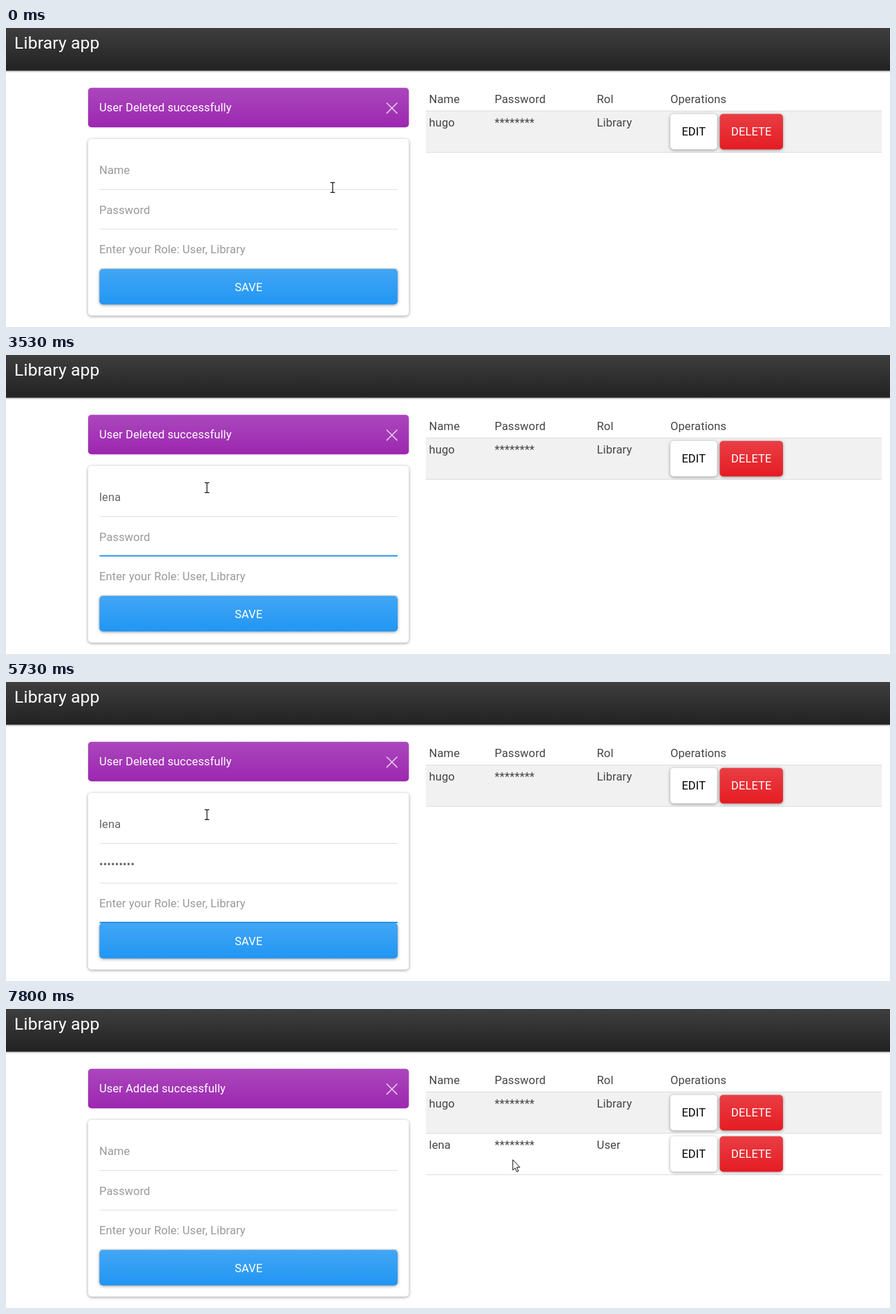
Animation of 1280x434 px, one loop 8 s. Source, as an HTML page:

```html
<!DOCTYPE html>
<html lang="en">
<head>
<meta charset="utf-8">
<title>Library app</title>
<style>
html, body { margin: 0; width: 100%; height: 100%; overflow: hidden; background: #fff; }
svg { display: block; }
text {
  font: 16.5px Roboto, sans-serif; letter-spacing: .11px; fill: #444;
  white-space: pre;
}
.title { font-size: 24.75px; }
.white { fill: #fff; }
.black { fill: #000; }
.mid { text-anchor: middle; }
.raised { filter: drop-shadow(0 1px 2px rgba(0,0,0,.4)); }
.bar { filter: drop-shadow(0 1px 1px rgba(0,0,0,.5)); }
</style>
</head>
<body>
<svg id="stage" width="1280" height="434">
  <defs>
    <linearGradient id="dark" x2="0" y2="1"><stop stop-color="#3e3e3e"/><stop offset="1" stop-color="#222"/></linearGradient>
    <linearGradient id="purple" x2="0" y2="1"><stop stop-color="#ab47bc"/><stop offset="1" stop-color="#9c27b0"/></linearGradient>
    <linearGradient id="blue" x2="0" y2="1"><stop stop-color="#42a6f5"/><stop offset="1" stop-color="#2196f3"/></linearGradient>
    <linearGradient id="red" x2="0" y2="1"><stop stop-color="#e93e44"/><stop offset="1" stop-color="#e51c23"/></linearGradient>
  </defs>
  <rect class="bar" x="-5" y="0" width="1290" height="61.8" fill="url(#dark)"/>
  <text class="white title" x="12.1" y="30.4">Library app</text>

  <rect x="118.8" y="86.7" width="464.6" height="57.6" rx="5" fill="url(#purple)"/>
  <text class="white" id="notice" x="135" y="121.4"></text>
  <path d="M551 108.5l15.6 15.6m0-15.6l-15.6 15.6" stroke="#fff" stroke-opacity=".7" stroke-width="1.7"/>

  <rect class="raised" x="118.8" y="161" width="464.6" height="256.4" rx="5" fill="#fff"/>
  <g id="fields"></g>
  <rect class="raised" x="135.3" y="349.7" width="431.8" height="51.6" rx="5" fill="url(#blue)"/>
  <text class="white mid" x="351.3" y="381.8">SAVE</text>
  <rect id="caret" width="1" height="19" fill="#666"/>

  <g id="table"></g>
  <path id="beam" d="M-3.3-7.2H-1.2Q0-7.2 0-6.2V6.2Q0 7.2-1.2 7.2H-3.3M3.3-7.2H1.2Q0-7.2 0-6.2M3.3 7.2H1.2Q0 7.2 0 6.2" fill="none" stroke="#111" stroke-width="1.2"/>
  <path id="arrow" d="M.5.5V15.6L3.9 12.4 6.4 18 8.7 17 6.3 11.5H10.8Z" fill="#fff" stroke="#111"/>
</svg>
<script>
const LOOP = 8000, TICK = 1000 / 15;
const LEFT = 135, BLINK = 520, FADE = 200;
const ARROW = 6660, SENT = 6990;
const $ = id => document.getElementById(id);

function add(parent, tag, attrs, label = '') {
  const el = document.createElementNS('http://www.w3.org/2000/svg', tag);
  for (const k in attrs) el.setAttribute(k, attrs[k]);
  el.textContent = label;
  parent.appendChild(el);
  return el;
}

const columns = [612.6, 707.6, 855.6, 962];
function addCells(parent, y, cells) {
  cells.forEach((c, i) => add(parent, 'text', { x: columns[i], y }, c));
}
function addButton(parent, x, y, width, fill, ink, label) {
  add(parent, 'rect', { x, y, width, height: 51.5, rx: 5, fill, class: 'raised' });
  add(parent, 'text', { x: x + width / 2, y: y + 31.2, class: 'mid ' + ink }, label);
}
function addUser(index, name, role) {
  const row = add($('table'), 'g', {}), y = 120 + index * 60;
  const band = { x: 608, width: 660 };
  add(row, 'rect', { ...band, y, height: 60, fill: index % 2 ? '#fff' : '#f1f1f1' });
  for (const edge of [y, y + 60]) add(row, 'rect', { ...band, y: edge, height: 1, fill: '#ddd' });
  addCells(row, y + 23, [name, '********', role]);
  addButton(row, 961.8, y + 4.7, 67.9, '#fff', 'black', 'EDIT');
  addButton(row, 1033.5, y + 4.7, 91.5, 'url(#red)', 'white', 'DELETE');
  return row;
}
addCells($('table'), 109.4, ['Name', 'Password', 'Rol', 'Operations']);
addUser(0, 'hugo', 'Library');
const newRow = addUser(1, 'lena', 'User');

// Each field gains focus, is typed evenly from first to last key, then loses focus.
const fields = [
  { hint: 'Name', value: 'lena', focus: 740, first: 2190, last: 2790 },
  { hint: 'Password', value: '•'.repeat(9), focus: 2950, first: 3660, last: 4660 },
  { hint: 'Enter your Role: User, Library', value: 'User', focus: 4820, first: 5930, last: 6340 }
];
fields.forEach((f, i) => {
  f.blur = i < 2 ? fields[i + 1].focus : SENT;
  f.y = 212 + i * 57.6;
  f.base = f.y + 22.9;
  f.gap = (f.last - f.first) / (f.value.length - 1);
  f.text = add($('fields'), 'text', { x: LEFT, y: f.y });
  f.line = add($('fields'), 'rect', { x: 135.5, width: 431.5 });
});

const clamp = v => Math.min(1, Math.max(0, v));
const smooth = p => p * p * (3 - 2 * p);
const lerp = (a, b, p) => a + (b - a) * p;
const mix = (a, b, p) => `rgb(${a.map((v, i) => Math.round(lerp(v, b[i], p)))})`;
const show = (el, on) => { el.style.visibility = on ? 'visible' : 'hidden'; };

function drawField(f, t) {
  const typed = t < f.first ? 0 : Math.min(f.value.length, Math.floor((t - f.first) / f.gap + .001) + 1);
  const filled = typed && t < SENT;
  f.text.textContent = filled ? f.value.slice(0, typed) : f.hint;
  f.text.style.fill = filled ? '#666' : '#999';

  const fadeOut = f.blur === SENT ? +(t >= SENT) : smooth(clamp((t - f.blur) / FADE));
  const level = smooth(clamp((t - f.focus) / FADE)) - fadeOut;
  f.line.setAttribute('y', f.base - 1 - level);
  f.line.setAttribute('height', 1 + level);
  f.line.setAttribute('fill', mix([221, 221, 221], [33, 150, 243], level));

  if (t < f.focus || t >= f.blur) return;
  const lastAct = typed ? f.first + (typed - 1) * f.gap : f.focus;
  show($('caret'), (t - lastAct) % (2 * BLINK) < BLINK);
  $('caret').setAttribute('x', LEFT + (filled ? f.text.getComputedTextLength() : .4));
  $('caret').setAttribute('y', f.y - 15.5);
}

function drawPointer(t) {
  const isArrow = t >= ARROW;
  const p = isArrow ? smooth(clamp((t - 7460) / 340)) : 1 - (1 - clamp(t / 300)) ** 2;
  const x = isArrow ? lerp(287, 733.3, p) : lerp(473, 291, p);
  const y = isArrow ? lerp(190, 218.3, p) + 40 * Math.sin(Math.PI * p) : lerp(231.5, 192.5, p);
  show($('arrow'), isArrow);
  show($('beam'), !isArrow);
  $(isArrow ? 'arrow' : 'beam').setAttribute('transform', `translate(${x} ${y})`);
}

function draw(t) {
  const sent = t >= SENT;
  $('notice').textContent = `User ${sent ? 'Added' : 'Deleted'} successfully`;
  show(newRow, sent);
  show($('caret'), false);
  fields.forEach(f => drawField(f, t));
  drawPointer(t);
}

const start = performance.now();
function tick() {
  const t = (performance.now() - start) % LOOP;
  draw(Math.floor((t + 4) / TICK) * TICK); // the screen refreshes 15 times a second
  requestAnimationFrame(tick);
}
tick();
</script>
</body>
</html>
```
